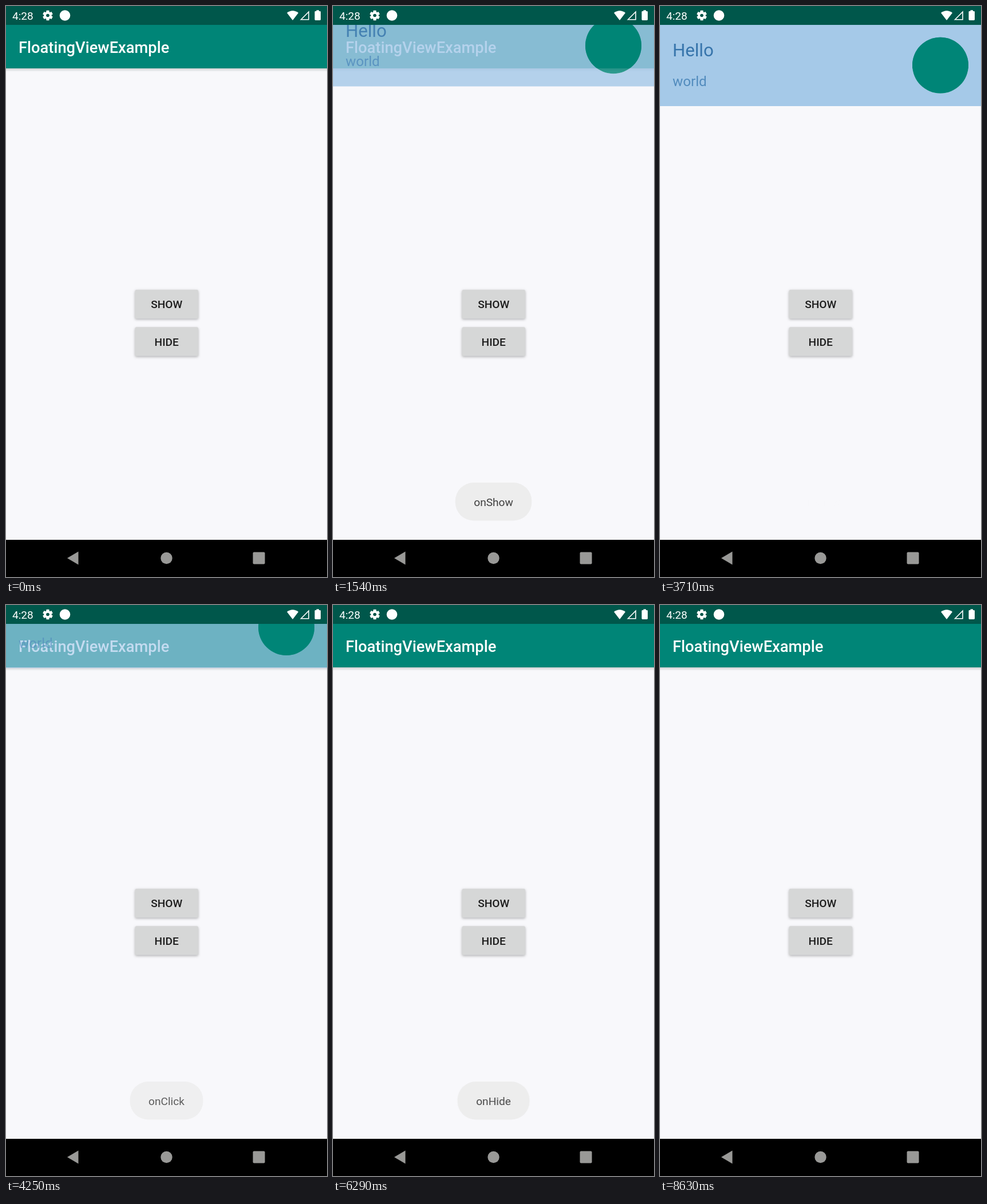
An HTML page with a canvas for the animation above (8.67 s loop, 561 by 998 pixels).

```html
<!DOCTYPE html>
<html lang="en">
<head>
<meta charset="utf-8">
<title>FloatingViewExample</title>
<style>
html, body { margin: 0; width: 561px; height: 998px; overflow: hidden; }
canvas { display: block; width: 561px; height: 998px; }
</style>
</head>
<body>
<canvas id="stage" width="561" height="998"></canvas>
<script>
const ctx = document.getElementById('stage').getContext('2d');
const W = 561, H = 998, LOOP = 8670;
const STATUS_H = 33, BAR_BOTTOM = 109, NAV_TOP = 933;
const PANEL_H = 142, SLIDE = 142, FADE_SPAN = 193;
const WHITE = '#ffffff', TEAL = '#008577';

const clamp = v => Math.max(0, Math.min(1, v));
const span = (t, start, length) => clamp((t - start) / length);
const decelerate = p => 1 - (1 - p) * (1 - p);
const smooth = p => 0.5 - Math.cos(p * Math.PI) / 2;

function rect(x, y, w, h, color) {
  ctx.fillStyle = color;
  ctx.fillRect(x, y, w, h);
}

function round(x, y, w, h, r, color) {
  ctx.fillStyle = color;
  ctx.beginPath();
  ctx.roundRect(x, y, w, h, r);
  ctx.fill();
}

function disc(x, y, r, color) {
  ctx.fillStyle = color;
  ctx.beginPath();
  ctx.arc(x, y, r, 0, Math.PI * 2);
  ctx.fill();
}

function poly(points, color) {
  ctx.fillStyle = color;
  ctx.beginPath();
  points.forEach(([x, y]) => ctx.lineTo(x, y));
  ctx.closePath();
  ctx.fill();
}

function label(text, x, y, size, color, weight = 400, align = 'left') {
  ctx.font = `${weight} ${size}px Roboto, sans-serif`;
  ctx.textAlign = align;
  ctx.fillStyle = color;
  ctx.fillText(text, x, y);
}

function gear(x, y) {
  ctx.save();
  ctx.translate(x, y);
  for (let i = 0; i < 6; i++) {
    round(-2.6, -8.8, 5.2, 6, 0.8, WHITE);
    ctx.rotate(Math.PI / 3);
  }
  ctx.strokeStyle = WHITE;
  ctx.lineWidth = 3.6;
  ctx.beginPath();
  ctx.arc(0, 0, 4.9, 0, Math.PI * 2);
  ctx.stroke();
  ctx.restore();
}

function drawStatus() {
  rect(0, 0, W, STATUS_H, '#00574b');
  label('4:28', 11, 24, 19.1, WHITE);
  gear(73, 16.5);
  disc(103, 16.5, 9.3, WHITE);

  // Wi-Fi
  ctx.fillStyle = WHITE;
  ctx.beginPath();
  ctx.moveTo(501, 25);
  ctx.lineTo(491, 12);
  ctx.quadraticCurveTo(501, 4.5, 511, 12);
  ctx.closePath();
  ctx.fill();

  // Mobile signal
  ctx.strokeStyle = WHITE;
  ctx.lineWidth = 1.6;
  ctx.beginPath();
  ctx.moveTo(515.5, 23.7);
  ctx.lineTo(529, 10.2);
  ctx.lineTo(529, 23.7);
  ctx.closePath();
  ctx.stroke();

  // Battery
  round(539.5, 9, 10.5, 16, 1.4, WHITE);
  rect(542.5, 7.3, 4.5, 3, WHITE);
}

function drawAppBar() {
  const shade = ctx.createLinearGradient(0, BAR_BOTTOM, 0, BAR_BOTTOM + 6);
  shade.addColorStop(0, 'rgba(0,0,0,0.16)');
  shade.addColorStop(1, 'rgba(0,0,0,0)');
  rect(0, BAR_BOTTOM, W, 6, shade);
  rect(0, STATUS_H, W, BAR_BOTTOM - STATUS_H, TEAL);
  label('FloatingViewExample', 22, 81.5, 27.3, WHITE, 500);
}

function drawNav() {
  const gray = '#999997';
  rect(0, NAV_TOP, W, H - NAV_TOP, '#000000');
  poly([[107, 965], [126.5, 953.5], [126.5, 976.5]], gray);
  disc(280.5, 965, 10.2, gray);
  round(431.5, 954.5, 21, 21, 2, gray);
}

function drawButton(text, y, lift, ripple) {
  const x = 225.5, w = 110.5, h = 50.5;
  ctx.save();
  ctx.shadowColor = `rgba(0,0,0,${0.28 + lift * 0.06})`;
  ctx.shadowBlur = 4 + lift * 7;
  ctx.shadowOffsetY = 1.6 + lift * 2.4;
  round(x, y, w, h, 2.7, '#d6d7d7');
  ctx.restore();
  if (ripple && ripple.alpha > 0) {
    ctx.save();
    ctx.beginPath();
    ctx.roundRect(x, y, w, h, 2.7);
    ctx.clip();
    disc(257, y + h / 2, ripple.radius, `rgba(0,0,0,${0.15 * ripple.alpha})`);
    ctx.restore();
  }
  label(text, 280.7, y + 32.2, 19.1, '#1c1c1c', 500, 'center');
}

function drawButtons(t) {
  const pressed = span(t, 580, 100) - span(t, 1020, 150);
  const ripple = {
    radius: 90 * decelerate(span(t, 580, 225)),
    alpha: span(t, 580, 75) * (1 - span(t, 1020, 300))
  };
  drawButton('SHOW', 496, pressed, ripple);
  drawButton('HIDE', 561.3, 0);
}

function drawPanel(t) {
  const away = 1 - smooth(span(t, 1205, 500)) + smooth(span(t, 4015, 500));
  if (away >= 1) return;
  const shift = -SLIDE * away;
  ctx.save();
  ctx.beginPath();
  ctx.rect(0, STATUS_H, W, NAV_TOP - STATUS_H);
  ctx.clip();
  ctx.translate(0, STATUS_H + shift);
  ctx.globalAlpha = 1 - away * SLIDE / FADE_SPAN;
  // Cut the disc out of the sheet so both fade as one layer
  ctx.fillStyle = '#a5c9e8';
  ctx.beginPath();
  ctx.rect(0, 0, W, PANEL_H);
  ctx.arc(490, 70.7, 49, 0, Math.PI * 2, true);
  ctx.fill('evenodd');
  disc(490, 70.7, 49, TEAL);
  label('Hello', 22, 55.2, 31.2, '#3674ab');
  label('world', 22, 106.8, 24.2, '#518bbd');
  ctx.restore();
}

function drawToast(text, t, start) {
  const alpha = decelerate(span(t, start, 500)) * (1 - decelerate(span(t, start + 2000, 500)));
  if (alpha <= 0) return;
  ctx.save();
  ctx.globalAlpha = alpha;
  ctx.font = '400 19.1px Roboto, sans-serif';
  const w = ctx.measureText(text).width + 65;
  round(280.5 - w / 2, 833, w, 66.5, 32, '#ebebeb');
  label(text, 280.5, 873.7, 19.1, '#212121', 400, 'center');
  ctx.restore();
}

function draw(t) {
  rect(0, 0, W, H, '#f8f8fb');
  drawAppBar();
  drawButtons(t);
  drawPanel(t);
  drawToast('onShow', t, 1235);
  drawToast('onClick', t, 4020);
  drawToast('onHide', t, 6025);
  drawStatus();
  drawNav();
}

const begin = performance.now();
function tick() {
  draw((performance.now() - begin) % LOOP);
  requestAnimationFrame(tick);
}
tick();
</script>
</body>
</html>
```
